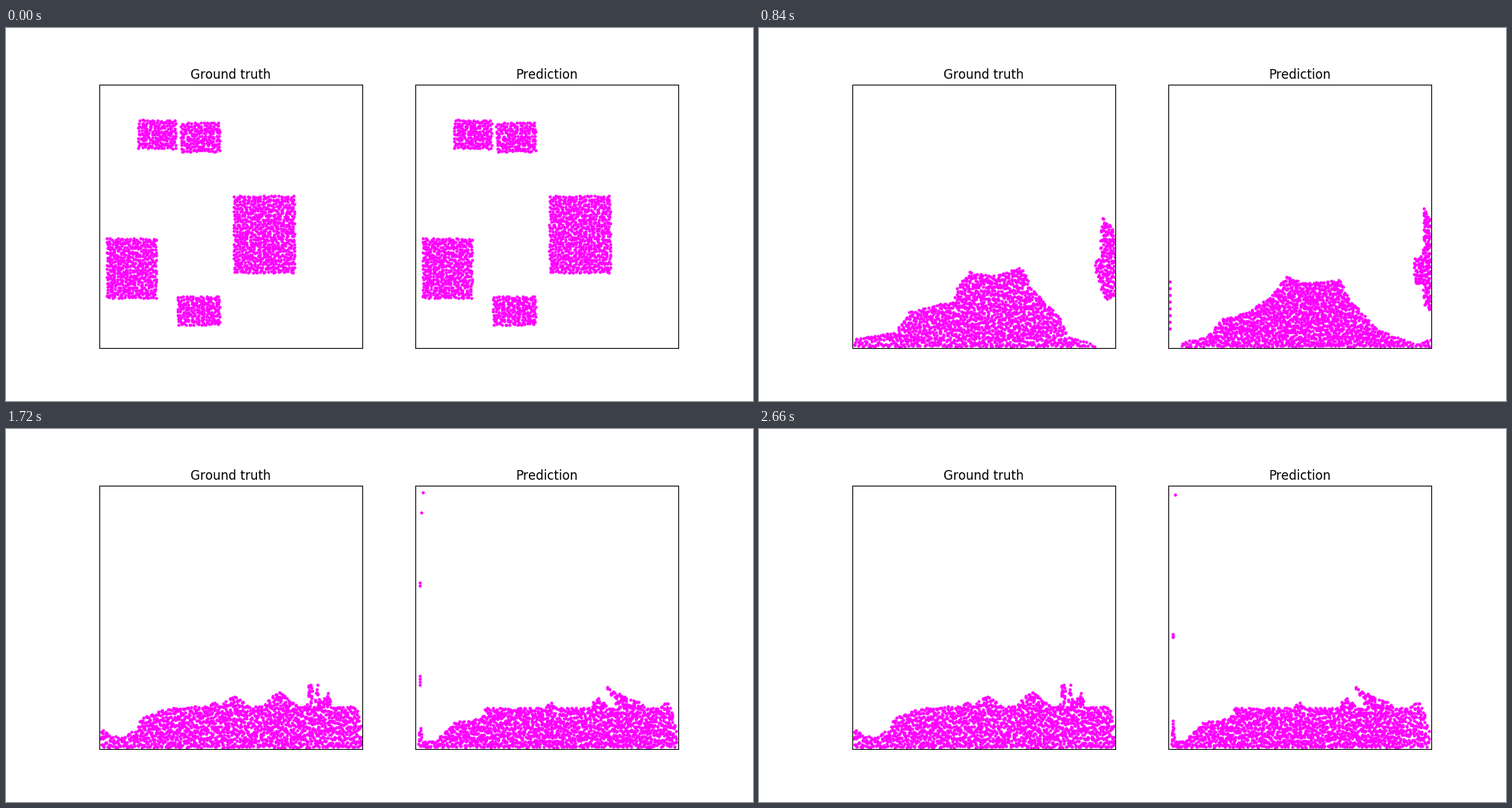
A matplotlib script that plays this animation: 1000 by 500 pixels, repeating every 2.68 s.

```python
import numpy as np
import matplotlib.pyplot as plt
from matplotlib.animation import FuncAnimation

FRAMES, INTERVAL = 134, 20
TIMES = np.array([0, 14, 26, 42, 54, 66, 70, 102, 133])  # key poses, in frames
GRAVITY = 0.12          # half the acceleration, px per frame squared
PITCH = 3.4             # distance between neighbouring particles
SIDE = 352.27
LEFT, RIGHT, TOP, FLOOR = 125, 477.27, 76.4, 427

# Size of each block and its centre at the start and at the first contact.
BLOCKS = dict(
    A=[(48, 36), (202, 142.5), (211.5, 217)],
    B=[(50, 37), (260, 146.5), (343, 157)],
    C=[(79, 101), (345.5, 276.5), (318, 275)],
    D=[(64, 78), (168, 322), (246.5, 300)],
    E=[(54, 36), (258, 379), (252, 387)],
)
LATE = dict(A=(217, 311), B=(414, 204))     # centres at the third key

# Outlines are a few corners; peaks are (x, height, half width).
TRUTH = dict(
    lift=0, tilt=dict(A=-28, B=-15), lump="CD",
    lump_top=[(247, 300), (258, 284), (260, 262), (279, 242), (300, 252),
              (353, 251), (358, 300), (368, 346)],
    lump_bottom=[(247, 372), (275, 376), (307, 390), (335, 362), (368, 349)],
    splat_top=[(449, 312), (457, 307), (458, 252), (476, 272)],
    splat_bottom=[(449, 320), (457, 347), (465, 366), (476, 358)],
    mound=[(127, 417), (182, 408), (201, 381), (260, 366), (266, 347),
           (282, 327), (312, 333), (352, 320), (364, 348), (405, 391),
           (413, 414), (451, 425)],
    heap=[(127, 399), (140, 411), (155, 413), (175, 402), (182, 386),
          (210, 377), (235, 372), (469, 372), (476, 400)],
    peaks=[(278, 8, 7), (305, 15, 22), (366, 21, 25), (407, 41, 6),
           (417, 32, 5), (430, 20, 9)],
    lean=0, drift=(0, 0), thrown=[],
)
PREDICTION = dict(
    lift=10, tilt=dict(A=-14, B=-3), lump="CDE",
    lump_top=[(225, 370), (242, 355), (248, 305), (256, 267), (277, 246),
              (300, 258), (349, 261), (362, 356)],
    lump_bottom=[(225, 400), (276, 405), (285, 395), (303, 403), (324, 399),
                 (347, 368), (362, 360)],
    splat_top=[(454, 309), (466, 305), (467, 241), (476, 258)],
    splat_bottom=[(454, 342), (466, 343), (467, 370), (476, 380)],
    mound=[(127, 418), (133, 424), (177, 414), (197, 390), (230, 382),
           (262, 360), (284, 332), (305, 342), (356, 338), (366, 362),
           (405, 404), (457, 424), (476, 416)],
    heap=[(127, 400), (133, 400), (135, 419), (157, 416), (180, 393),
          (215, 388), (222, 374), (468, 374), (475, 405)],
    peaks=[(308, 9, 8), (372, 14, 14), (408, 31, 16), (418, 15, 18),
           (462, 9, 8)],
    lean=1.2, drift=(-5, -8),
    # how many fly up the left wall, then their heights at three late keys
    thrown=[(1, 84, 85, 88), (1, 82, 159, 278), (2, 210, 203, 275),
            (4, 288, 374, 391)],
)


def lattice(size, rng):
    """Jittered grid of (u, v) coordinates inside a block."""
    nx, ny = np.round(np.array(size) / PITCH).astype(int) + 1
    grid = np.stack(np.meshgrid(np.arange(nx), np.arange(ny)), -1).reshape(-1, 2)
    return (grid + rng.uniform(-0.4, 0.4, grid.shape)) / (nx - 1, ny - 1)


def place(uv, size, centre, tilt=0, flare=0):
    p = (uv - 0.5) * size
    p[:, 0] *= 1 + flare * uv[:, 1]
    c, s = np.cos(np.radians(tilt)), np.sin(np.radians(tilt))
    return p @ np.array([[c, s], [-s, c]]) + centre


def outline(points, peaks=()):
    def height(x):
        bumps = [h * (1 - abs(x - c) / w) for c, h, w in peaks]
        return np.interp(x, *zip(*points)) - np.max([0 * x] + bumps, axis=0)
    return height


def pack(order, y_order, span, top, bottom, rough, rng):
    """Fill the area between two outlines evenly, keeping the particles' order."""
    xs = np.linspace(*span, 800)
    area = np.cumsum(np.maximum(bottom(xs) - top(xs), 1))
    n = len(order)
    x = np.empty(n)
    x[np.argsort(order)] = np.interp((np.arange(n) + 0.5) / n * area[-1], area, xs)
    column = ((x - xs[0]) / PITCH).astype(int)
    depth = np.empty(n)
    for c in np.unique(column):
        members = np.flatnonzero(column == c)
        members = members[np.argsort(y_order[members])]
        m = len(members)
        rows = np.arange(m) + rng.uniform(-rough, rough, m)
        depth[members] = (rows + 0.2) / (m - 0.6)
    depth = 1 - abs(1 - abs(depth))
    x = np.clip(x + rng.uniform(-rough, rough, n), *span)
    return np.column_stack([x, top(x) + depth * (bottom(x) - top(x))])


def throw(keys, groups):
    """Send the leftmost particles up the wall; they sink again later."""
    chosen = iter(np.argsort(keys[3, :, 0]))
    launch = 340
    for count, *late in groups:
        for j in range(count):
            i = next(chosen)
            y = np.array(late) + 4 * j
            keys[3:, i, 1] = [launch, launch + 0.66 * (y[0] - launch), y[0] - 2, *y]
            keys[3:5, i, 0] = 127, 128.5
            keys[5:, i, 0] = 131 + 0.04 * np.maximum(0, 180 - keys[5:, i, 1])
            launch += 9


def build(panel):
    """Positions and velocities of all particles at every key time."""
    rng = np.random.default_rng(4)
    cells = {name: lattice(block[0], rng) for name, block in BLOCKS.items()}
    label = np.repeat(list(cells), [len(uv) for uv in cells.values()])
    flyer, low = label == "B", label == "E"
    ground = outline([(LEFT, FLOOR), (RIGHT, FLOOR)])

    start = np.vstack([place(cells[k], size, a) for k, (size, a, _) in BLOCKS.items()])
    touch = np.vstack([place(cells[k], size, b, -6 if k in LATE else 0)
                       for k, (size, _, b) in BLOCKS.items()])
    touch[low] -= 0, panel["lift"]

    fall = touch.copy()
    for k, centre in LATE.items():
        fall[label == k] = place(cells[k], BLOCKS[k][0], centre, panel["tilt"][k])
    fall[low] = place(cells["E"], (54, 28), (246, 411), flare=0.64)
    lump = np.isin(label, list(panel["lump"]))
    top, bottom = panel["lump_top"], panel["lump_bottom"]
    fall[lump] = pack(*touch[lump].T, (top[0][0], top[-1][0]), outline(top),
                      outline(bottom), 0.35, rng)

    splat = fall.copy()
    top, bottom = panel["splat_top"], panel["splat_bottom"]
    splat[flyer] = pack(*fall[flyer].T, (top[0][0], top[-1][0]), outline(top),
                        outline(bottom), 0.5, rng)
    order = fall[:, 0].copy()       # the lowest block is squeezed along the floor
    order[low] = 293 + 330 * (order[low] - order[low].mean()) / np.ptp(order[low])
    mound = panel["mound"]
    splat[~flyer] = pack(order[~flyer], fall[~flyer, 1],
                         (mound[0][0], mound[-1][0]), outline(mound), ground,
                         0.6, rng)

    heap = panel["heap"]
    rest = pack(*splat.T, (heap[0][0], heap[-1][0]), outline(heap, panel["peaks"]),
                ground, 0.9, rng)
    crest = abs(rest[:, 0] - 406) < 18
    rest[crest, 0] -= panel["lean"] * np.maximum(0, 366 - rest[crest, 1])

    loose = np.clip(np.minimum(rest[:, :1] - 130, 478 - rest[:, :1]) / 30, 0, 1)
    keys = np.array([start, touch, fall, splat]
                    + [splat + s * (rest - splat) for s in (0.8, 0.98, 1)]
                    + [rest + loose * (d, 0) for d in panel["drift"]])
    throw(keys, panel["thrown"])
    return keys, velocities(keys)


def velocities(keys):
    """Monotone slopes, so that nothing overshoots its key poses."""
    slopes = np.diff(keys, axis=0) / np.diff(TIMES)[:, None, None]
    a, b = slopes[:-1], slopes[1:]
    same = a * b > 0
    result = np.zeros_like(keys)
    result[1:-1] = np.where(same, 2 * a * b / np.where(same, a + b, 1), 0)
    result[2] = slopes[1] + (0, GRAVITY * (TIMES[2] - TIMES[1]))
    return result


def pose(keys, speeds, frame):
    k = min(np.searchsorted(TIMES, frame, "right") - 1, len(TIMES) - 2)
    t0, t1 = TIMES[k], TIMES[k + 1]
    dt = t1 - t0
    s = (frame - t0) / dt
    if k < 2:   # free flight
        p = keys[k] + s * (keys[k + 1] - keys[k])
        p[:, 1] -= GRAVITY * (frame - t0) * (t1 - frame)
    else:
        ease = s * s * (3 - 2 * s)
        p = (keys[k] + ease * (keys[k + 1] - keys[k])
             + dt * s * (1 - s) ** 2 * speeds[k]
             - dt * s * s * (1 - s) * speeds[k + 1])
    return np.clip(p, (LEFT + 1.5, TOP + 2), (RIGHT - 1, FLOOR + 0.5))


plt.rcParams["text.kerning_factor"] = 6
fig, axes = plt.subplots(1, 2, figsize=(10, 5), dpi=100)
panels = []
for ax, title, panel in zip(axes, ("Ground truth", "Prediction"),
                            (TRUTH, PREDICTION)):
    ax.set_title(title)
    ax.set_xlim(LEFT, RIGHT)
    ax.set_ylim(TOP + SIDE, TOP)
    ax.set_xticks([])
    ax.set_yticks([])
    ax.set_aspect(1)
    dots, = ax.plot([], [], "o", ms=2, color="magenta")
    panels.append((dots, *build(panel)))


def update(frame):
    for dots, keys, speeds in panels:
        dots.set_data(*pose(keys, speeds, frame).T)
    return [dots for dots, _, _ in panels]


anim = FuncAnimation(fig, update, frames=FRAMES, interval=INTERVAL, repeat=True)
plt.show()
```
